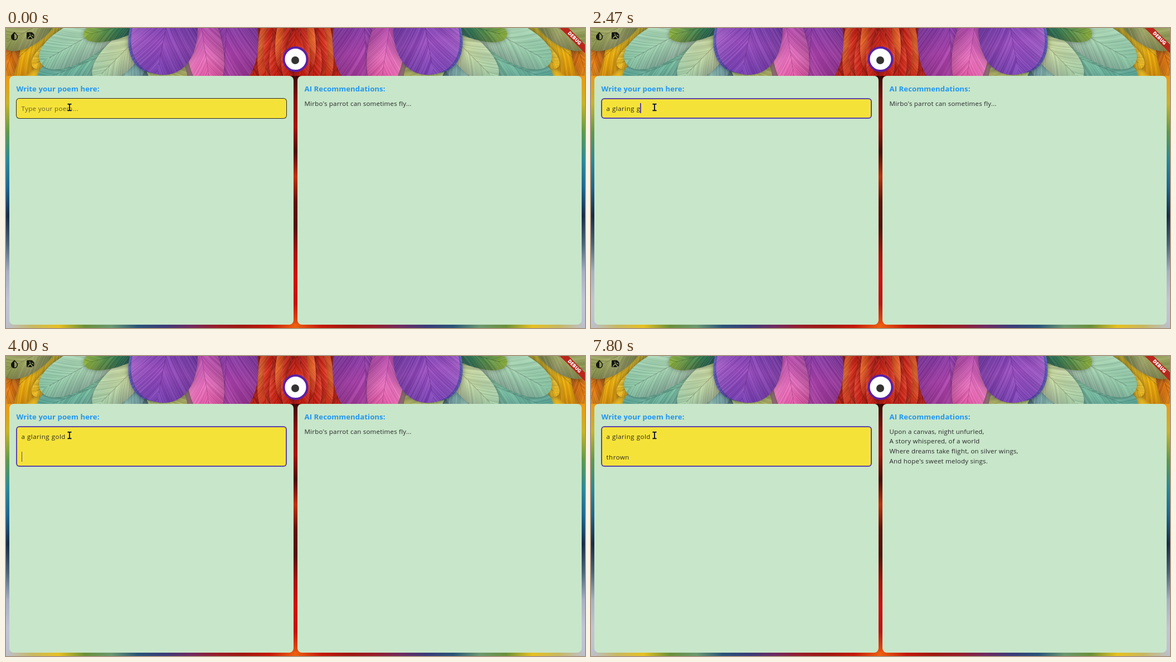
These frames come from a looping animation (1039x539 px, 8 s). An HTML page with a canvas:

```html
<!DOCTYPE html>
<html lang="en">
<head>
<meta charset="utf-8">
<title>Poem editor</title>
<style>
  html, body { margin: 0; width: 100%; height: 100%; overflow: hidden; }
  body { position: relative; background: #c23a12; font: 11.5px "Open Sans", "Noto Sans", sans-serif; color: #26282a; }
  body > * { position: absolute; }
  #back, #over { left: 0; top: 0; width: 1039px; height: 539px; }
  .panel { top: 86px; width: 510px; height: 447px; border-radius: 8px; background: #c8e6c9; }
  .panel > * { position: absolute; left: 12.5px; margin: 0; white-space: pre; }
  h2 { top: 14px; font-size: 13.2px; line-height: 18px; letter-spacing: .06px; color: #2196f3; }
  #tips { top: 40.9px; line-height: 17.6px; letter-spacing: .22px; }
  #field { left: 12px; top: 40px; width: 486px; border-radius: 6px; background: #f5e239; }
  #hint, #poem { position: absolute; left: 9.5px; top: 10.4px; line-height: 18.25px; }
  #hint { letter-spacing: .36px; color: #66602c; }
  #poem { letter-spacing: .52px; color: #2c2a1c; }
  #caret { position: relative; }
  #caret::after { content: ""; position: absolute; left: 0; top: -2px; width: 1.5px; height: 18px; background: #5b3fa5; }
  #ribbon { right: 0; top: 0; width: 60px; height: 60px; overflow: hidden; }
  #ribbon b { position: absolute; left: -8.7px; top: 13px; width: 100px; height: 11px; transform: rotate(45deg);
    background: #b9261c; color: #fff; font-size: 8.7px; font-weight: 800; line-height: 11px; text-align: center; }
</style>
</head>
<body>
<canvas id="back" width="1039" height="539"></canvas>
<section class="panel" style="left:6px">
  <h2>Write your poem here:</h2>
  <div id="field"><span id="hint">Type your poem...</span><div id="poem"><span id="text"></span><span id="caret">&#8203;</span></div></div>
</section>
<section class="panel" style="left:523px">
  <h2>AI Recommendations:</h2>
  <p id="tips"></p>
</section>
<div id="ribbon"><b>DEBUG</b></div>
<svg id="over" viewBox="0 0 1039 539">
  <circle cx="519.5" cy="56" r="21" fill="#fff" stroke="#5a20a5" stroke-width="4"/>
  <circle cx="519" cy="58" r="7" fill="#333"/>
  <g fill="#15160f">
    <path d="M15 8.2 11.4 12a5.4 5.4 0 1 0 7.4 0Z" fill="none" stroke="#15160f" stroke-width="1.5"/>
    <path d="M15 8v13.4a5.6 5.6 0 0 1-3.9-9.5Z"/>
    <path d="M38.5 7.5h8l4 4v5.5l-2.5 3h-9.5q-1.5 0-1.5-1.5v-9.5q0-1.5 1.5-1.5Z"/>
  </g>
  <path d="m39 19 4.5-5 5 6M42 10.5l2 1.5M46 12.5l3 2" fill="none" stroke="#a9b47a" stroke-width="1.2"/>
  <path d="M110.5 136.8h2.5l1 .7 1-.7h2.5M110.5 148.3h2.5l1-.7 1 .7h2.5M114 137v11" fill="none" stroke="#14183a" stroke-width="2"/>
</svg>
<script>
const LOOP = 8000;
const $ = id => document.getElementById(id);

// Typing: [time, text added]
const KEYS = [
  [600, "a"], [670, " "], [1000, "g"], [1200, "l"], [1400, "a"], [1530, "r"], [1670, "i"],
  [1870, "n"], [1930, "g "], [2470, "g"], [2600, "o"], [2800, "l"], [2870, "d"],
  [3730, "\n"], [4000, "\n"], [5870, "t"], [6270, "h"], [6470, "r"], [6600, "o"],
  [7070, "w"], [7130, "n"], [7270, " "]
];
// Spans in which the caret is hidden
const HIDDEN = [[0, 330], [3400, 3730], [4530, 5000], [5470, 5870], [7800, LOOP]];
const TIP = "Mirbo's parrot can sometimes fly...";
const VERSE = "Upon a canvas, night unfurled,\nA story whispered, of a world\n" +
  "Where dreams take flight, on silver wings,\nAnd hope's sweet melody sings.";

function put(id, value) {
  if ($(id).textContent !== value) $(id).textContent = value;
}

function render(t) {
  const typed = KEYS.filter(k => k[0] <= t).map(k => k[1]).join("");
  put("text", typed);
  put("tips", t < 4930 ? TIP : VERSE);
  $("hint").style.visibility = typed ? "hidden" : "visible";
  $("caret").style.visibility = HIDDEN.some(([a, b]) => t >= a && t < b) ? "hidden" : "visible";
  $("field").style.height = Math.floor(37 + 18.25 * (typed.split("\n").length - 1)) + "px";
  const edge = t < 270 ? "1px #2b2a26" : t < 330 ? "1.5px #453470" : "2px #5b45a8";
  $("field").style.boxShadow = "inset 0 0 0 " + edge;
}

let seed = 7;
const rnd = () => (seed = seed * 16807 % 2147483647) / 2147483647;

function paintBack() {
  const c = $("back").getContext("2d");

  function blend(x0, y0, x1, y1, colors) {
    const g = c.createLinearGradient(x0, y0, x1, y1);
    colors.forEach((s, i) => g.addColorStop(i / (colors.length - 1), s));
    return g;
  }

  // Root, tip, width, colours from root to tip
  function feather(x0, y0, x1, y1, w, ...colors) {
    const len = Math.hypot(x1 - x0, y1 - y0);
    c.save();
    c.translate(x0, y0);
    c.rotate(Math.atan2(y1 - y0, x1 - x0));
    c.beginPath();
    c.moveTo(0, 0);
    c.bezierCurveTo(len * .25, -w * .7, len, -w * .7, len, 0);
    c.bezierCurveTo(len, w * .7, len * .25, w * .7, 0, 0);
    c.shadowColor = "rgba(20,20,20,.4)";
    c.shadowBlur = 9;
    c.fillStyle = blend(0, 0, len, 0, colors);
    c.fill();
    c.shadowBlur = 0;
    c.clip();
    // one vane lies in the shade
    c.fillStyle = blend(0, -w * .5, 0, w * .5, ["rgba(20,0,50,.22)", "rgba(20,0,50,0)", "rgba(255,255,255,.12)"]);
    c.fillRect(0, -w, len, w * 2);
    for (let x = -w; x < len; x += 1.6) {
      for (const side of [-1, 1]) {
        c.strokeStyle = rnd() < .5 ? "rgba(255,255,255,.07)" : "rgba(20,0,30,.08)";
        c.beginPath();
        c.moveTo(x, 0);
        c.quadraticCurveTo(x + w * .3, side * w * .15, x + w * .8, side * w * .6);
        c.stroke();
      }
    }
    c.strokeStyle = "rgba(40,10,50,.25)";
    c.beginPath();
    c.moveTo(0, 0);
    c.lineTo(len * .9, 0);
    c.stroke();
    c.restore();
  }

  function half() {
    c.fillStyle = blend(0, 0, 520, 0, ["#e88a10", "#e9b820", "#9ccaa0", "#8fc49a", "#86a860",
      "#4a6a8a", "#8a8a70", "#b83c90", "#b81c10", "#de2a0c", "#e8420f"]);
    c.fillRect(0, 0, 520, 100);

    feather(110, -30, -25, 98, 64, "#7a8a3a", "#e8c020", "#ffb400", "#f08c00");
    feather(22, 8, -8, 102, 30, "#6a3a10", "#e87808", "#f59a10");
    feather(95, -25, -8, 30, 52, "#5f7a3c", "#a8b068", "#8c9848");
    feather(130, 0, 48, 70, 34, "#a8bf50", "#e0cc30", "#f0b818");
    feather(235, 25, 58, 96, 62, "#b8dca8", "#78c4a4", "#58a898");
    feather(220, -25, 62, 62, 66, "#dcecc0", "#aadab4", "#88c8a4");
    feather(255, 20, 190, 112, 56, "#3f7888", "#80b8b4", "#a8d0b0");
    feather(268, -15, 160, 94, 56, "#7fa848", "#ccdfa4", "#a0d0a8");
    feather(262, -18, 140, 14, 40, "#204a60", "#307c50", "#90b438");
    feather(252, 20, 312, 115, 62, "#3f8c88", "#a8c070", "#d8d060");

    for (let i = 0; i < 9; i++)
      feather(440 + i * 10, -35 + i % 3 * 18, 432 + i * 11, 78 + i % 2 * 22, 30,
        "#b01810", i % 3 ? "#e02810" : "#f2601a", "#c01408");

    feather(402, -90, 388, 112, 112, "#4a2a80", "#7a38a8", "#b444b4", "#a83a98");
    feather(342, -60, 368, 112, 62, "#8a38a8", "#c050b8", "#f070c0", "#e84c9c");
    feather(290, -85, 258, 80, 96, "#2c3c98", "#4450c0", "#5a48b8");
    feather(303, -85, 271, 83, 112, "#402488", "#6a38ac", "#9c4cc4", "#7a40b8");

    c.fillStyle = blend(0, 86, 0, 539, ["#ef9a10", "#c8b428", "#5e9a4c", "#2a8a98",
      "#1c6690", "#182c48", "#4a6478", "#a8b0c4", "#c0c4d4", "#bcc0d0"]);
    c.fillRect(0, 86, 14, 453);
    c.fillStyle = blend(0, 86, 0, 539, ["#380806", "#8c0c08", "#a81408", "#4c0806", "#c0300c",
      "#601008", "#54100a", "#a81208", "#d40c10", "#c41010", "#ec5a10"]);
    c.fillRect(506, 86, 14, 453);
    c.fillStyle = blend(0, 0, 520, 0, ["#bcc0d0", "#c8b860", "#e8c020", "#6a9038", "#6c9870",
      "#2a5478", "#3a3c78", "#702a60", "#981c28", "#a01810", "#c41808", "#ec6010"]);
    c.fillRect(0, 531, 520, 8);
  }

  half();
  c.save();
  c.translate(1039, 0);
  c.scale(-1, 1);
  half();
  c.restore();
}

paintBack();
const start = performance.now();
function tick() {
  render((performance.now() - start) % LOOP);
  requestAnimationFrame(tick);
}
tick();
</script>
</body>
</html>
```
